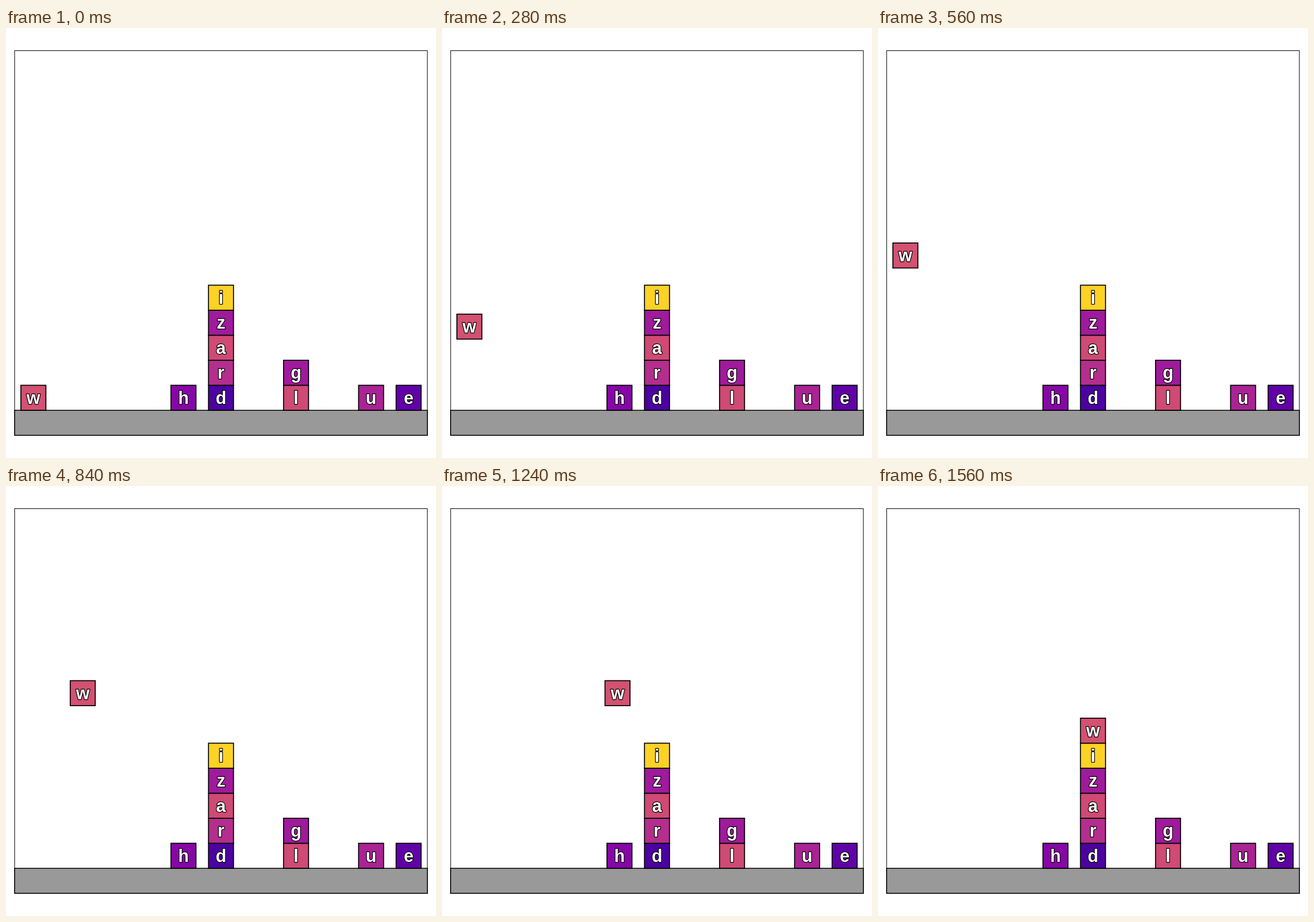
Animation, 748 px wide and 748 px high, one loop 1600 ms. Source, as an HTML page:

```html
<!DOCTYPE html>
<html lang="en">
<head>
<meta charset="utf-8">
<title>Stacking blocks</title>
<style>
  html, body { margin: 0; width: 100%; height: 100%; overflow: hidden; background: #fff; }
  svg { display: block; width: 100vw; height: 100vh; }
  rect { stroke: #000; stroke-width: 1.7; }
  .frame { fill: none; stroke: #222; stroke-width: 1.2; }
  .ground { fill: #999; stroke-width: 1.5; }
  text {
    font: bold 30.5px "Liberation Sans", Arial, sans-serif;
    text-anchor: middle;
    fill: #fff;
    stroke: #000;
    stroke-width: 2.4;
    stroke-linejoin: round;
    paint-order: stroke;
  }
</style>
</head>
<body>
<svg id="stage" viewBox="0 0 748 748">
  <rect class="frame" x="15" y="39.4" width="718" height="669.2"/>
  <rect class="ground" x="15" y="665" width="718" height="43.5"/>
</svg>
<script>
const SIZE = 43.52, SLOT = 718 / 11, FLOOR = 665;
const STEP = 40, LOOP = 1600;

// letter, colour, column, height in blocks
const blocks = [
  ["h", "#8606a6", 4, 0],
  ["d", "#4c02a1", 5, 0],
  ["r", "#b42e8d", 5, 1],
  ["a", "#cf4a75", 5, 2],
  ["z", "#a01a9c", 5, 3],
  ["i", "#fcd225", 5, 4],
  ["l", "#cf4a75", 7, 0],
  ["g", "#a01a9c", 7, 1],
  ["u", "#a92395", 9, 0],
  ["e", "#6100a7", 10, 0],
  ["w", "#d35171", 0, 0]
];

// step, column, height
const path = [[0, 0, 0], [16, 0, 6.5], [35, 5, 6.5], [39, 5, 5]];

const stage = document.getElementById("stage");

function add(parent, tag, attrs) {
  const el = document.createElementNS("http://www.w3.org/2000/svg", tag);
  for (const key in attrs) el.setAttribute(key, attrs[key]);
  return parent.appendChild(el);
}

function place(el, col, row) {
  const x = 15 + (col + 0.5) * SLOT;
  const y = FLOOR - (row + 0.5) * SIZE;
  el.setAttribute("transform", `translate(${x} ${y})`);
}

function makeBlock([letter, fill, col, row]) {
  const g = add(stage, "g", {});
  add(g, "rect", { x: -SIZE / 2, y: -SIZE / 2, width: SIZE, height: SIZE, fill });
  add(g, "text", { y: 10.7 }).textContent = letter;
  place(g, col, row);
  return g;
}

const mover = blocks.map(makeBlock).pop();
const start = performance.now();

function draw(now) {
  const step = Math.floor((Math.max(0, now - start) % LOOP) / STEP);
  const i = Math.max(1, path.findIndex(p => p[0] >= step));
  const [s0, c0, r0] = path[i - 1];
  const [s1, c1, r1] = path[i];
  const k = (step - s0) / (s1 - s0);
  place(mover, c0 + (c1 - c0) * k, r0 + (r1 - r0) * k);
  requestAnimationFrame(draw);
}

draw(start);
</script>
</body>
</html>
```
